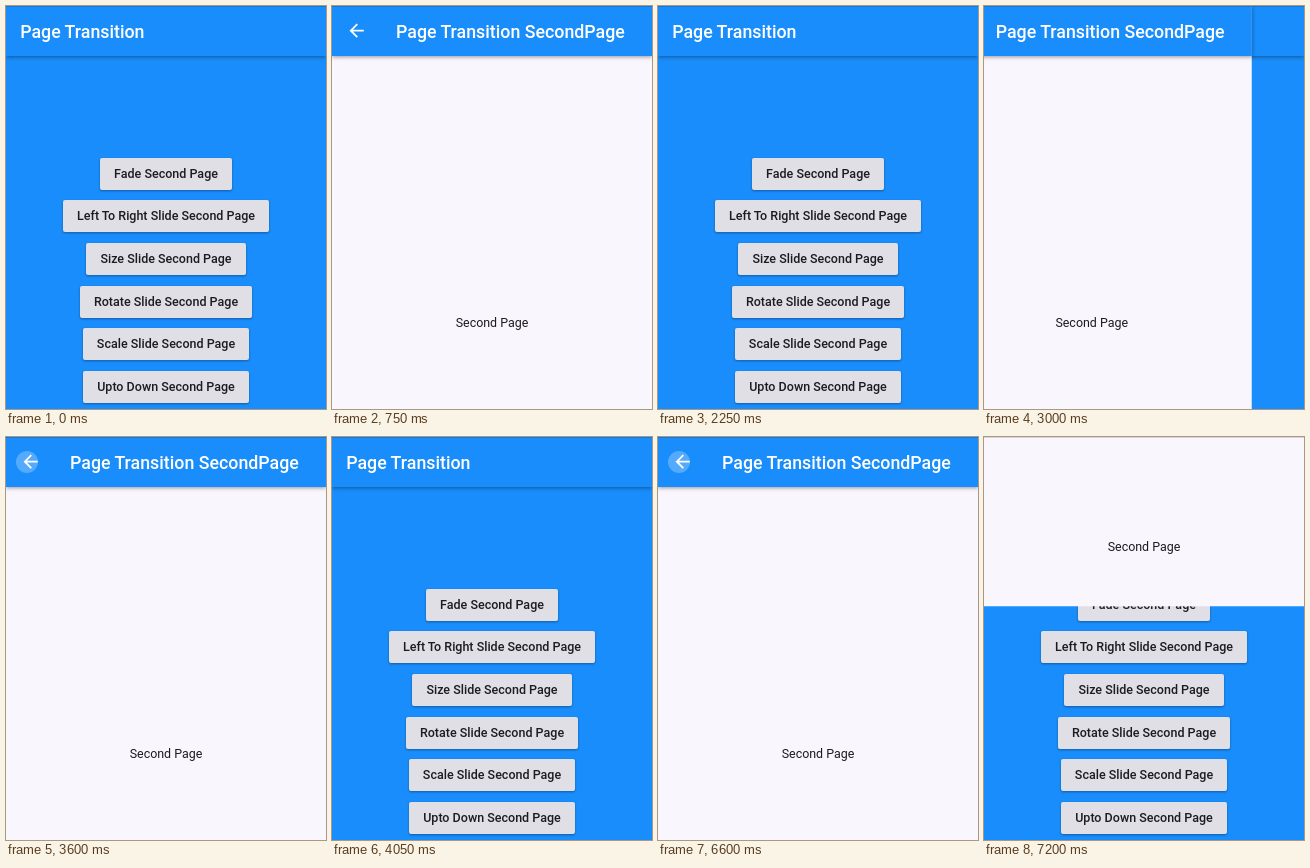
Write an HTML page that moves like this. It is 320 by 403 pixels and loops after 7.35 s.

```html
<!DOCTYPE html>
<html lang="en">
<head>
<meta charset="utf-8">
<title>Page transitions</title>
<style>
  html, body { margin: 0; width: 100%; height: 100%; overflow: hidden; }
  body { position: relative; background: #198dfb; font: 12.44px Roboto, Arial, sans-serif; color: #1c1b20; }
  .page { position: absolute; left: 0; top: 0; width: 320px; height: 584px; background: #198dfb; }
  #second { background: #faf6fd; }
  .bar {
    position: absolute; width: 320px; height: 50px; box-sizing: border-box; padding-left: 14.2px;
    background: #198dfb; color: #fff; font-size: 17.78px; font-weight: 500; line-height: 52px;
    white-space: nowrap; box-shadow: 0 1px 4px rgba(0, 0, 0, .4);
  }
  #second .bar { padding-left: 64px; }
  .bar svg { position: absolute; left: 14.2px; top: 14.4px; }
  .ripple { position: absolute; border-radius: 50%; transform: translate(-50%, -50%); }
  .bar .ripple { background: #fff; }
  #list { position: absolute; top: 151.7px; width: 320px; }
  .button {
    position: relative; width: max-content; height: 32px; margin: 0 auto 10.67px; padding: 0 14.2px;
    overflow: hidden; border-radius: 2px; background: #e1dfe6; font-size: 12.5px; font-weight: 500;
    line-height: 32px; white-space: nowrap;
  }
  .shade { filter: drop-shadow(0 1px 1px rgba(0, 0, 0, .35)); }
  .button .ripple { left: 50%; top: 50%; background: #000; }
  #note { position: absolute; top: 307px; width: 320px; line-height: 20px; text-align: center; }
  #edge { position: absolute; width: 320px; height: 1px; background: rgba(0, 0, 0, .14); }
</style>
</head>
<body>
<div class="page">
  <div class="bar">Page Transition</div>
  <div id="list"></div>
</div>
<div class="page" id="second">
  <div class="bar">
    <div class="ripple" id="tap"></div>
    <svg width="21.33" height="21.33" viewBox="0 0 24 24" fill="#fff"><path d="M20 11H7.83l5.59-5.59L12 4l-8 8 8 8 1.41-1.41L7.83 13H20z"/></svg>
    Page Transition SecondPage
  </div>
  <div id="note">Second Page</div>
</div>
<div id="edge"></div>
<script>
const LOOP = 7350, STEP = 150, SPAN = 300, WIDTH = 320, HEIGHT = 584;
const $ = id => document.getElementById(id);
const second = $('second'), tap = $('tap');

$('list').innerHTML = ['Fade', 'Left To Right Slide', 'Size Slide', 'Rotate Slide', 'Scale Slide', 'Upto Down']
  .map(name => `<div class="shade"><div class="button">${name} Second Page<div class="ripple"></div></div></div>`)
  .join('');
const splashes = document.querySelectorAll('.button .ripple');

// Each visit: pressed button, press and opening times, back press and closing times
const visits = [
  { kind: 'fade', button: 0, press: 150, open: 180, back: 1800, close: 1845 },
  { kind: 'slide', button: 1, press: 2700, open: 2749, back: 3600, close: 3645 },
  { kind: 'size', button: 2, press: 4950, open: 4977, back: 6600, close: 6987 }
];

const clamp = v => Math.min(1, Math.max(0, v));

function ripple(el, age, radius, growth, alpha, life) {
  const on = age >= 0 && age < life;
  el.style.opacity = on ? alpha * (1 - age / life) : 0;
  el.style.width = el.style.height = 2 * (radius + growth * Math.max(0, age)) + 'px';
}

function draw(now) {
  const t = Math.floor(now % LOOP / STEP) * STEP;
  const visit = visits.findLast(v => t >= v.press) || visits[0];
  const shown = clamp((t - visit.open) / SPAN) - clamp((t - visit.close) / SPAN);
  const x = visit.kind === 'slide' ? (shown - 1) * WIDTH : 0;
  const cut = visit.kind === 'size' ? (1 - shown) * HEIGHT / 2 : 0;

  second.style.visibility = shown > 0 ? 'visible' : 'hidden';
  second.style.opacity = visit.kind === 'fade' ? shown : 1;
  second.style.transform = `translate(${x}px, ${-cut}px)`;
  second.style.clipPath = cut ? `inset(0 0 ${cut}px)` : 'none';

  const age = t - visit.back;
  tap.style.left = 21 + 4 * clamp(age / STEP) + 'px';
  tap.style.top = '25px';
  ripple(tap, age, 11, Math.min(.113, 17 / Math.max(1, age)), .26, 450);
  splashes.forEach((el, i) =>
    ripple(el, i === visit.button ? t - visit.press : -1, 24, .3, .1, 600));
  requestAnimationFrame(draw);
}
requestAnimationFrame(draw);
</script>
</body>
</html>
```
